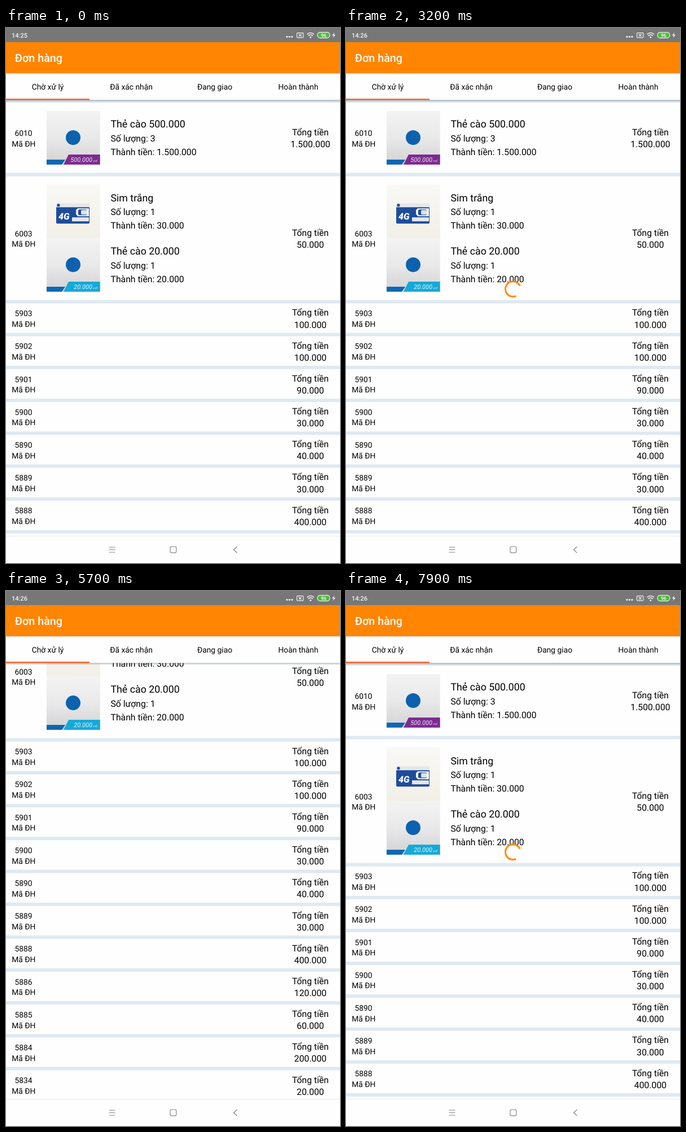
These frames come from a looping animation (592x947 px, 8 s). An HTML page:

```html
<!DOCTYPE html>
<html lang="vi">
<head>
<meta charset="utf-8">
<title>Đơn hàng</title>
<style>
html, body { margin: 0; width: 100%; height: 100%; overflow: hidden; background: #fdfefd; }
svg { display: block; font-family: Roboto, sans-serif; text-rendering: geometricPrecision; }
.mid { text-anchor: middle; }
/* A 600 dp wide screen shown at 592 px */
svg { --dp: calc(592px / 600); }
.s14 { font-size: calc(14 * var(--dp)); }
.s16 { font-size: calc(16 * var(--dp)); }
.s18 { font-size: calc(18 * var(--dp)); }
.s20 { font-size: calc(20 * var(--dp)); }

.list { animation: scroll 8s linear infinite; }
@keyframes scroll {
  0%, 19.5% { transform: translateY(0); }
  19.5% { animation-timing-function: cubic-bezier(.35, .2, .5, 1); }
  25%, 32.45% { transform: translateY(-631px); }
  32.46%, 65.6% { transform: translateY(0); }
  65.6% { animation-timing-function: cubic-bezier(.33, 0, .67, .33); }
  71.25% { transform: translateY(-220px); animation-timing-function: cubic-bezier(.33, .67, .67, 1); }
  82.5%, 91.2% { transform: translateY(-631px); }
  91.21%, 100% { transform: translateY(0); }
}

.pressed { animation: press 8s linear infinite; }
@keyframes press {
  0%, 14.4% { opacity: 1; }
  18%, 19.5% { opacity: .2; }
  22.6%, 100% { opacity: 1; }
}

.before { animation: before 8s step-end infinite; }
.after { animation: after 8s step-end infinite; }
@keyframes before { 0% { opacity: 1; } 4.95% { opacity: 0; } }
@keyframes after { 0% { opacity: 0; } 4.95% { opacity: 1; } }

/* Indeterminate ring: steady turn, drifting start, growing and shrinking arc */
.spin { opacity: 0; }
.spin.a { --d: -5480ms; animation: showA 8s step-end infinite; }
.spin.b { --d: -780ms; animation: showB 8s step-end infinite; }
@keyframes showA { 0% { opacity: 0; } 32.46% { opacity: 1; } 59.3% { opacity: 0; } }
@keyframes showB { 0% { opacity: 0; } 91.21% { opacity: 1; } }
.turn { animation: turn 8s linear var(--d) infinite; }
@keyframes turn { from { transform: rotate(-90deg); } to { transform: rotate(1206deg); } }
.arc {
  fill: none; stroke: #ff8608; stroke-width: 3;
  animation: drift 1333.333ms linear var(--d) infinite, trim 1333.333ms cubic-bezier(.4, 0, .2, 1) var(--d) infinite;
}
@keyframes drift { to { transform: rotate(90deg); } }
@keyframes trim {
  0% { stroke-dasharray: 0 360; stroke-dashoffset: 0; }
  50% { stroke-dasharray: 270 360; stroke-dashoffset: 0; }
  100% { stroke-dasharray: 0 360; stroke-dashoffset: -270; }
}
</style>
</head>
<body>
<svg width="592" height="947" viewBox="0 0 592 947">
  <defs>
    <linearGradient id="card" x2="0" y2="1">
      <stop stop-color="#f3f3f4"/><stop offset=".5" stop-color="#e9e9ea"/><stop offset="1" stop-color="#d2d2d4"/>
    </linearGradient>
    <linearGradient id="photo" x2="0" y2="1">
      <stop stop-color="#f8f8f6"/><stop offset="1" stop-color="#f2efe6"/>
    </linearGradient>
    <linearGradient id="shade" x2="0" y2="1">
      <stop stop-color="#49545c" stop-opacity=".45"/><stop offset="1" stop-color="#49545c" stop-opacity="0"/>
    </linearGradient>
  </defs>

  <rect y="127" width="592" height="773" fill="#dfe9f2"/>
  <g class="list" id="list"></g>

  <g transform="translate(296 462)">
    <g class="spin a"><g class="turn"><circle class="arc" r="13.5" pathLength="360"/></g></g>
    <g class="spin b"><g class="turn"><circle class="arc" r="13.5" pathLength="360"/></g></g>
  </g>

  <rect y="127" width="592" height="4" fill="url(#shade)"/>
  <rect y="80" width="592" height="47.4" fill="#fdfefd"/>
  <rect y="80" width="592" height="3" fill="url(#shade)" opacity=".5"/>
  <g id="tabs" class="s14 mid"></g>
  <rect y="125.2" width="148" height="2.2" fill="#f4581c"/>

  <rect y="25" width="592" height="55" fill="#ff8502"/>
  <text class="s20" x="15.8" y="60" font-weight="500" fill="#fff">Đơn hàng</text>

  <rect width="592" height="25" fill="#777"/>
  <g font-size="11" font-weight="500" fill="#f4f4f4">
    <text class="before" x="10" y="17">14:25</text>
    <text class="after" x="10" y="17">14:26</text>
  </g>
  <g fill="#f4f4f4">
    <circle cx="498" cy="15.5" r="1.6"/><circle cx="502.5" cy="15.5" r="1.6"/><circle cx="507" cy="15.5" r="1.6"/>
    <circle cx="539.8" cy="16.6" r="1.5"/>
    <path d="M582 8l-4 5.3h2.8l-1.2 4.2 4.4-5.5h-2.8z"/>
  </g>
  <g fill="none" stroke="#f4f4f4" stroke-width="1.2">
    <rect x="515.6" y="8.6" width="11.4" height="8.6" rx="1.5"/>
    <path d="M519 10.7l4.6 4.4M523.6 10.7l-4.6 4.4"/>
    <path stroke-width="1.6" d="M533.6 11.2q6.2-5.4 12.4 0M535.7 13.8q4.1-3.6 8.2 0"/>
    <rect x="552.2" y="7.6" width="21.6" height="10" rx="4.5" fill="#4fb83c"/>
  </g>
  <text class="mid" x="563" y="15.7" font-size="8.5" font-weight="500" fill="#fff">96</text>

  <rect y="899" width="592" height="48" fill="#fdfefd"/>
  <rect y="899" width="592" height="1" fill="#e9eaea"/>
  <g fill="none" stroke="#858585" stroke-width="1.2">
    <path d="M182.5 919h11M182.5 923.5h11M182.5 928h11"/>
    <rect x="291" y="918" width="10.8" height="10.8" rx="2.2"/>
    <path d="M409.5 918l-6 5.5 6 5.5"/>
  </g>
</svg>

<script>
const text = (x, y, cls, s) => `<text x="${x}" y="${y}" class="${cls}">${s}</text>`;

// One order: white panel, number on the left, total on the right
const order = (top, height, id, total, body = '') => {
  const mid = top + height / 2;
  return `<g class="${id === 5889 ? 'pressed' : ''}">
    <rect y="${top}" width="592" height="${height}" fill="#fdfefd"/>
    ${text(31, mid - 3.4, 's14 mid', id)}${text(31.3, mid + 15.3, 's14 mid', 'Mã ĐH')}
    ${text(539.5, mid - 4.1, 's16 mid', 'Tổng tiền')}${text(539.5, mid + 17, 's16 mid', total)}
    ${body}</g>`;
};

const item = (y, name, count, price, art) =>
  `<g transform="translate(72 ${y})">${art}</g>` +
  text(185.5, y + 29.3, 's18', name) +
  text(185.5, y + 54, 's16', 'Số lượng: ' + count) +
  text(185.5, y + 77.6, 's16', 'Thành tiền: ' + price);

const card = (value, color) =>
  `<rect width="94.7" height="94.7" fill="url(#card)"/>
  <circle cx="47" cy="47" r="13" fill="#0c62ae"/>
  <path d="M0 86h33l-6 8.7H0z" fill="#0f66b2"/>
  <path d="M39 77h55.7v17.7H30z" fill="${color}"/>
  <g fill="#fff" font-style="italic" opacity=".9"><text x="81" y="90" text-anchor="end" font-size="11">${value}</text>
  <text x="82" y="90" font-size="5">vnđ</text></g>`;

const sim =
  `<rect width="94.7" height="94.7" fill="url(#photo)"/>
  <path d="M17 33h59v7H17z" fill="#e4e7ea"/>
  <path d="M17 40h59v27q0 2-2 2H19q-2 0-2-2z" fill="#1d4c9b"/>
  <circle cx="21" cy="36.5" r="2.6" fill="#1d4c9b"/>
  <text x="21" y="62" font-size="16" font-weight="900" font-style="italic" fill="#fff">4G</text>
  <path d="M55 42h20v14H55l-3-4v-7z" fill="#f2f4f6"/>
  <rect x="56" y="44" width="15" height="10" rx="2.5" fill="#1d4c9b"/>
  <rect x="61" y="45" width="10" height="8" rx="2" fill="#dfe3e6"/>
  <rect x="45" y="58" width="30" height="7" fill="#e4e7ea"/>`;

const short = [
  [5903, '100.000'], [5902, '100.000'], [5901, '90.000'], [5900, '30.000'], [5890, '40.000'],
  [5889, '30.000'], [5888, '400.000'], [5886, '120.000'], [5885, '60.000'], [5884, '200.000'],
  [5834, '20.000'], [5823, '180.000'], [5822, '600.000'], [5821, '100.000'], [5819, '3.200.000'],
  [5818, '40.000'], [5805, '210.000'], [5804, '1.500.000']
];

document.getElementById('list').innerHTML =
  order(132.1, 124.4, 6010, '1.500.000',
    item(147, 'Thẻ cào 500.000', 3, '1.500.000', card('500.000', '#7d2a90'))) +
  order(262.4, 219.1, 6003, '50.000',
    item(277.2, 'Sim trắng', 1, '30.000', sim) +
    item(372, 'Thẻ cào 20.000', 1, '20.000', card('20.000', '#15a9d8'))) +
  short.map(([id, total], i) => order(487.4 + i * 58.2, 52.3, id, total)).join('');

document.getElementById('tabs').innerHTML =
  ['Chờ xử lý', 'Đã xác nhận', 'Đang giao', 'Hoàn thành']
    .map((name, i) => text(74 + i * 148, 109, '', name)).join('');
</script>
</body>
</html>
```
